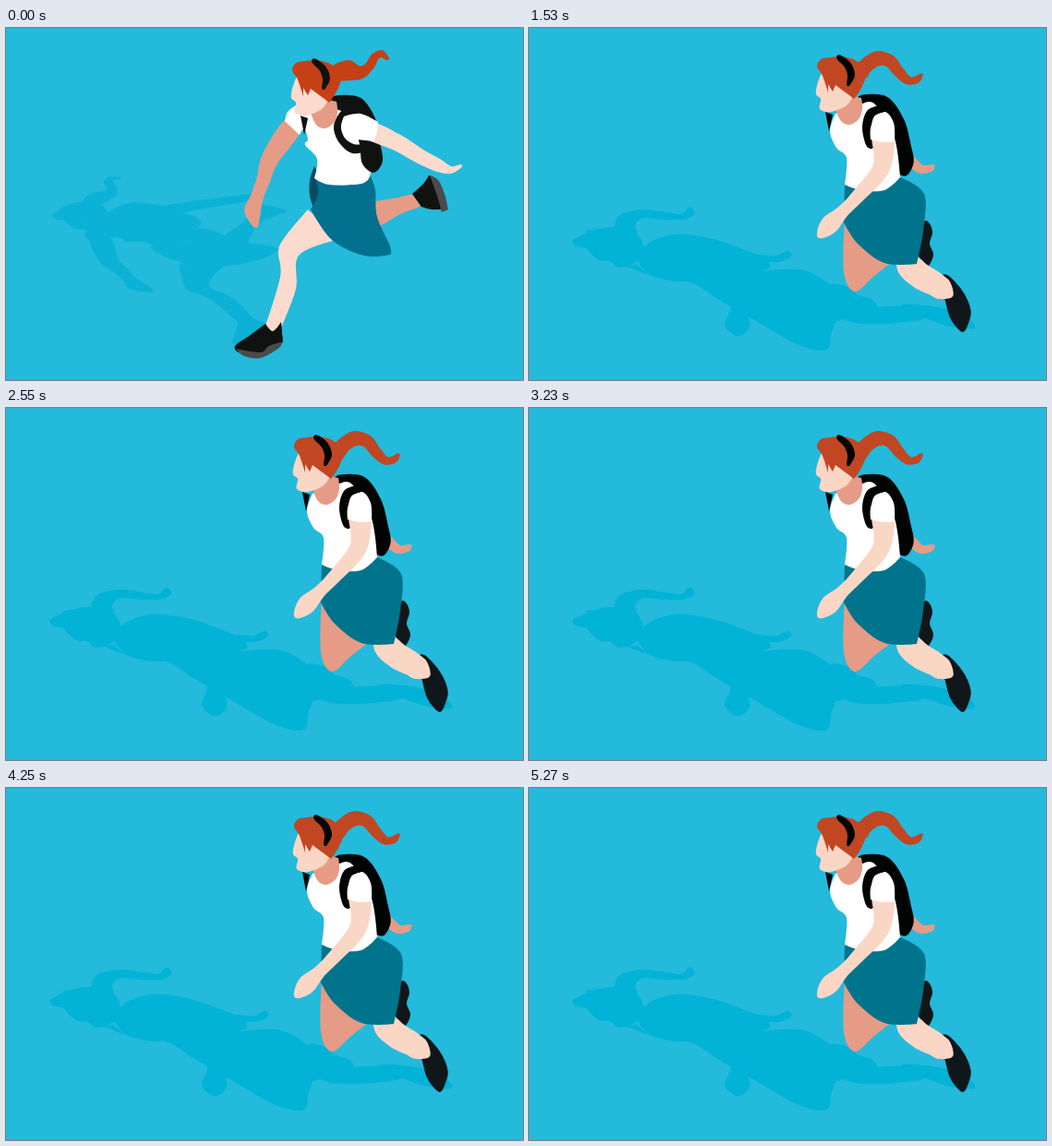
Write an HTML page that moves like this. It is 560x382 px and loops after 5.44 s.

```html
<!DOCTYPE html>
<html lang="en">
<head>
<meta charset="utf-8">
<title>Running girl</title>
<style>
html, body { margin: 0; width: 100%; height: 100%; overflow: hidden; background: #23badb; }
svg { display: block; width: 100%; height: 100%; }
</style>
</head>
<body>
<svg id="stage" viewBox="0 0 560 382"></svg>
<script>
const NS = 'http://www.w3.org/2000/svg';
const STEP = 170;
const stage = document.getElementById('stage');
const white = '#fff', tan = '#e69b86', sole = '#4b4a4c', underSkirt = '#054d63';
const day = { skin: '#fbdbcd', hair: '#c54017', ink: '#10120f', shoe: '#10120f', skirt: '#03708f', shade: '#0cb2d6' };
const dusk = { skin: '#fad6c5', hair: '#c14722', ink: '#020303', shoe: '#10171a', skirt: '#00748d', shade: '#02b3d7' };

// Closed Catmull-Rom curve; a sharp point has no handles.
function curve(pts) {
  const at = i => pts[(i + pts.length) % pts.length];
  const handle = (i, sign) => {
    const p = at(i), k = p.sharp ? 0 : sign / 6;
    const x = p.x + (at(i + 1).x - at(i - 1).x) * k;
    const y = p.y + (at(i + 1).y - at(i - 1).y) * k;
    return x.toFixed(1) + ',' + y.toFixed(1);
  };
  const parts = pts.map((p, i) => `C${handle(i, 1)} ${handle(i + 1, -1)} ${at(i + 1).x},${at(i + 1).y}`);
  return `M${pts[0].x},${pts[0].y}${parts.join('')}Z`;
}

// Outline through "x,y" points; "!" marks a corner.
function blob(fill, text) {
  const pts = text.split(' ').map(word => {
    const [x, y] = word.replace('!', '').split(',').map(Number);
    return { x, y, sharp: word.endsWith('!') };
  });
  return { fill, d: curve(pts) };
}

// Round-ended tapered tube through "x,y,radius" joints.
function limb(fill, text) {
  const joints = text.split(' ').map(word => word.split(',').map(Number));
  const last = joints.length - 1;
  const offset = (i, turn) => {
    const [x, y, r] = joints[i];
    const from = joints[Math.max(i - 1, 0)], to = joints[Math.min(i + 1, last)];
    const angle = Math.atan2(to[1] - from[1], to[0] - from[0]) + turn;
    return { x: x + r * Math.cos(angle), y: y + r * Math.sin(angle) };
  };
  const side = turn => joints.map((_, i) => offset(i, turn));
  return { fill, d: curve([
    offset(0, Math.PI), ...side(-Math.PI / 2), offset(last, 0), ...side(Math.PI / 2).reverse()
  ]) };
}

const moved = (transform, parts) => ({ transform, parts });

function draw(parent, part, tint) {
  const node = document.createElementNS(NS, part.parts ? 'g' : 'path');
  if (part.transform) node.setAttribute('transform', part.transform);
  if (part.parts) {
    part.parts.forEach(child => draw(node, child, tint));
  } else {
    node.setAttribute('d', part.d);
    node.setAttribute('fill', tint || part.fill);
  }
  return parent.appendChild(node);
}

// The shadow is the same figure projected on the ground.
function pose(colors, projection, parts) {
  const group = draw(stage, { parts: [] });
  draw(group, moved(`matrix(${projection})`, parts), colors.shade);
  draw(group, { parts });
  group.setAttribute('display', 'none');
  return group;
}

const head = (c, tail) => [
  blob(tan, '330,92! 336,105 345,109 355,103 359,92 358,80! 345,77!'),
  blob(c.ink, '319,95! 327,98! 323,116!'),
  blob(c.skin, '315,52! 310,66 309,76 314,81 313,92 325,95 342,88 350,76! 340,60'),
  limb(c.hair, tail),
  blob(c.hair, '310,46 314,38 324,36 338,35 353,40 363,53 358,69 350,81! 345,77 330,66! 327,73! 322,65! 322,74! 316,56'),
  limb(c.ink, '334,36,3 343,44,4 347,55,4 344,65,2')
];

const frontShoe = c => [
  blob(c.shoe, '249,350 249,344 262,335 273,327 281,321! 289,329 298,319! 299,331 298,343 276,355 258,354'),
  blob(sole, '249,348! 275,352 285,345 298,341! 296,347 276,358 258,356')
];
const forwardLeg = color =>
  blob(color, '327,197! 302,227 295,243 297,270 281,323! 290,330 299,323! 314,283 317,247 354,231! 340,210');

const stride = pose(day, [0.77, -0.386, 0.8, 0.37, -222, 310], [
  limb(tan, '398,203,13 425,193,9 446,187,7'),
  blob(day.shoe, '440,180! 452,169 458,160! 468,167 477,196! 462,197 450,194!'),
  blob(sole, '459,160! 468,165 475,180 479,197! 472,200! 467,182'),
  blob(underSkirt, '334,150! 329,165 329,182 333,195! 344,168!'),
  forwardLeg(day.skin),
  ...frontShoe(day),
  blob(day.skirt, '335,162! 365,171 395,161! 400,176 402,205 417,240 410,247 384,246 352,229 330,197! 338,180'),
  limb(tan, '309,108,11 286,142,9.5 279,164,7.5 272,183,7 267,198,9 270,213,4'),
  blob(white, '314,84! 305,91 302,101! 318,116! 323,109 327,121 324,127 337,142 334,163! 350,170 385,169 394,161! 394,140 374,100 365,83! 345,92!'),
  limb(day.ink, '357,80,7 378,85,11 389,103,12 394,125,11 397,146,11'),
  limb(day.ink, '381,88,4 366,93,4 359,107,4 364,122,4 376,131,5 389,130,4'),
  limb(day.skin, '394,111,10 425,125,9 448,139,8 468,149,7 482,154,4 492,150,2'),
  blob(white, '366,96! 384,93 403,102! 402,113 398,123! 372,120! 363,109'),
  ...head(day, '358,48,9 372,46,11 385,48,7 394,41,5 400,31,4.5 407,28,4 413,33,2')
]);

const backPack = limb(dusk.ink, '362,79,7 382,84,11 394,104,13 400,130,14 405,149,12');
const upperBody = [
  blob(white, '332,93! 326,112 333,130 344,141 342,170! 360,176 385,176 402,162! 396,120 376,84 364,81!'),
  limb(dusk.ink, '380,88,4 370,93,5 366,108,5 370,126,5'),
  limb(dusk.skin, '383,116,11.5 384,139,10.5 378,158,9 352,187,7 339,200,7 326,213,10 317,223,6'),
  blob(white, '370,121! 371,105 385,91 395,103 396,123! 384,124'),
  moved('translate(2 -4)', head(dusk, '356,54,8 364,44,8 376,37,8 389,40,7 399,52,6 409,61,4.5 418,60,4 423,55,2'))
];

const passing = pose(dusk, [1.02, -0.4, 0.94, 0.53, -307, 339], [
  limb(tan, '412,142,5 424,153,5 435,152,4 439,149,1'),
  backPack,
  limb(dusk.shoe, '430,214,5 430,222,7 428,234,6 430,246,8 429,256,5'),
  blob(tan, '342,208! 341,265 353,286 374,269 392,255! 360,230'),
  limb(dusk.shoe, '451,273,6 461,292,11 467,310,12 469,324,6'),
  limb(dusk.skin, '409,256,13 424,269,14 440,278,13 450,285,11'),
  blob(dusk.skirt, '342,169! 360,176 385,175 402,162! 428,180 427,220 420,256! 385,255 356,234 341,211!'),
  ...upperBody
]);

const opposite = pose(dusk, [0.85, -0.386, 0.9, 0.37, -281, 310], [
  limb(tan, '404,122,11 424,140,9 443,152,6 453,152,2'),
  backPack,
  limb(dusk.skin, '410,225,18 445,214,13 478,200,9'),
  blob(dusk.shoe, '472,190! 489,174 497,172! 508,186 515,210! 498,212 482,210!'),
  forwardLeg(tan),
  ...frontShoe(dusk),
  blob(dusk.skirt, '342,169! 360,176 385,175 402,162! 421,195 430,235 410,249 375,245 345,225 334,202!'),
  ...upperBody
]);

const cycle = [stride, passing, opposite, passing];
let shown = null;

function render(time) {
  const next = cycle[Math.floor(time / STEP) % cycle.length];
  if (next === shown) return;
  if (shown) shown.setAttribute('display', 'none');
  next.setAttribute('display', 'inline');
  shown = next;
}

const start = performance.now();
function tick() {
  render(performance.now() - start);
  requestAnimationFrame(tick);
}
tick();
</script>
</body>
</html>
```
